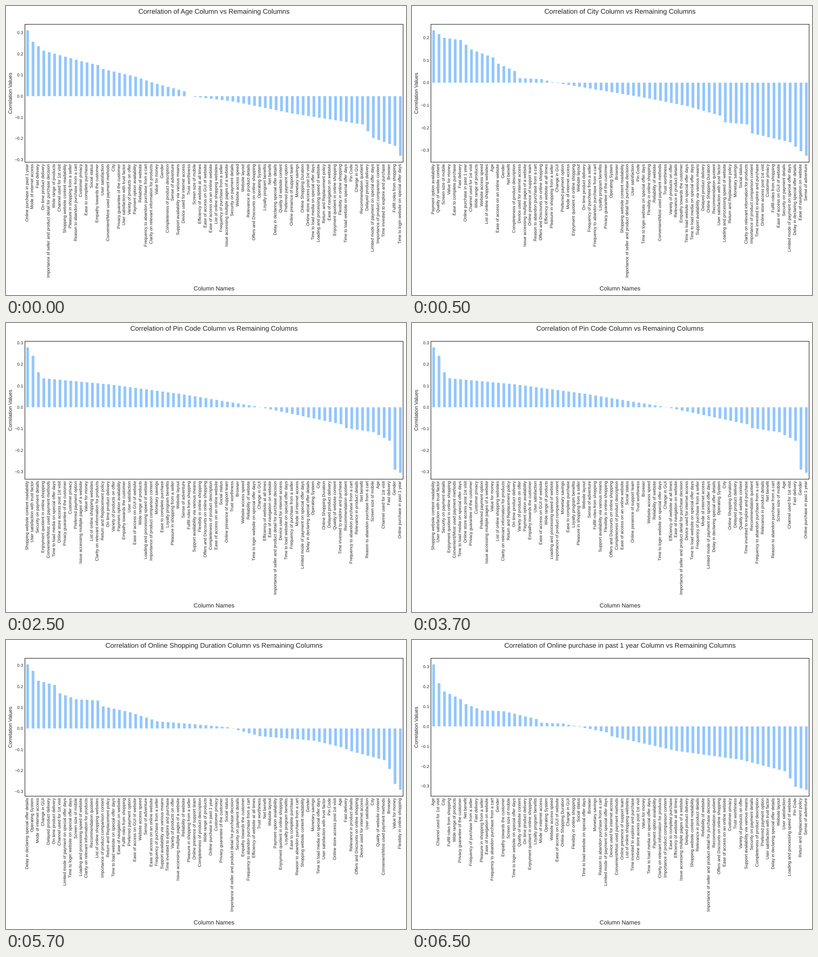
An HTML page for the animation above (8 s loop, 880 by 637 pixels).

```html
<!DOCTYPE html>
<html lang="en">
<head>
<meta charset="utf-8">
<title>Column correlations</title>
<style>
html, body { margin: 0; width: 100%; height: 100%; overflow: hidden; background: #fff; }
svg { display: block; width: 880px; height: 637px; }
text {
  font-family: "Liberation Sans", Arial, sans-serif;
  font-size: 9.35px;
  fill: #262626;
  text-rendering: geometricPrecision;
}
.title { font-size: 14.93px; text-anchor: middle; }
.xname { font-size: 13px; text-anchor: middle; }
.yname { font-size: 11.15px; text-anchor: middle; }
.end { text-anchor: end; }
.bar { fill: #92c6ff; }
.frame { fill: none; stroke: #262626; stroke-width: 1.2; }
</style>
</head>
<body>
<svg id="stage" viewBox="0 0 880 637"></svg>
<script>
const names = {};
`age Age
city City
pin Pin Code
dur Online Shopping Duration
year Online purchase in past 1 year
mode Mode of internet access
fast Fast delivery
ontime On time product delivery
seller Importance of seller and product detail for purchase decision
range Wide range of products
chan Channel used for 1st visit
read Shopping website content readability
pleas Pleasure in shopping from a seller
reason Reason to abandon purchase from a cart
cpriv Customer privacy
compl Ease to complete purchase
social Social status
empathy Empathy towards the customer
user User satisfaction
conv Convenient/Most used payment methods
guar Privacy guarantee of the customer
trust User satisfaction with trust factor
variety Variety of products on offer
payopt Payment option availability
reliab Reliability of website
abandon Frequency to abandon purchase from a cart
clarity Clarity on relevant information for products
value Value for money
gender Gender
desc Completeness of product description
sense Sense of adventure
support Support availability via various means
device Device used for internet access
worthy Trust worthiness
screen Screen size of mobile
effic Efficiency of website at all times
gui Ease of access on GUI of website
access Ease of access on an online website
list List of online shopping websites
freq Frequency of purchase from a seller
issue Issue accessing multiple pages of a website
secur Security on payment details
speed Website access speed
layout Website layout
relev Relevance in product details
offers Offers and Discounts on online shopping
os Operating System
loyal Loyalty program benefits
net Net benefit
delay Delay in declaring special offer details
quality Quality of website content
prefer Preferred payment option
team Online presence of support team
money Monetary savings
post Online store access post 1st visit
media Time to load media on special offer days
loading Loading and processing speed of website
policy Return and Replacement policy
nav Ease of navigation on website
enjoy Enjoyment quotient in online shopping
flex Flexibity in online shopping
webload Time to load website on special offer days
change Change in GUI
recom Recommendation quotient
delayed Delayed product delivery
limited Limited mode of payment on special offer days
compare Importance of product comparison content
invest Time invested to explore and purchase
browser Browser
roles Fulfill roles from shopping
login Time to login website on special offer days`.split('\n').forEach(row => {
  const cut = row.indexOf(' ');
  names[row.slice(0, cut)] = row.slice(cut + 1);
});

const stage = document.getElementById('stage');
const box = { left: 41.6, right: 873.6, top: 40.4, bottom: 344.3 };
const midX = (box.left + box.right) / 2;
const barTop = 53.7, barSpan = 276.4;
const charts = [];

function add(parent, tag, attrs, text) {
  const el = document.createElementNS('http://www.w3.org/2000/svg', tag);
  for (const k in attrs) el.setAttribute(k, attrs[k]);
  if (text) el.textContent = text;
  parent.appendChild(el);
  return el;
}

const upright = (x, y) => `translate(${x} ${y}) rotate(-90)`;

// Height of the falling curve at bar i, straight between its bends.
function valueAt(bends, i) {
  const k = Math.max(1, bends.findIndex(b => b[0] >= i));
  const [x0, v0] = bends[k - 1], [x1, v1] = bends[k];
  return v0 + (v1 - v0) * (i - x0) / (x1 - x0);
}

// Bends are [bar index, correlation in thousandths].
function chart(start, key, order, bends) {
  const g = add(stage, 'g', { visibility: 'hidden' });
  const ids = order.split(/\s+/);
  const max = bends[0][1], min = bends[bends.length - 1][1];
  const scale = barSpan / (max - min);
  const zero = barTop + max * scale;
  const pad = (max - min) * 0.05;
  const step = (box.right - box.left) / ids.length;

  add(g, 'text', { class: 'title', x: midX, y: 17.2 },
    `Correlation of ${names[key]} Column vs Remaining Columns`);

  for (let v = -300; v <= 300; v += 100) {
    if (v < min - pad || v > max + pad) continue;
    const label = (v < 0 ? '\u2212' : '') + (Math.abs(v) / 1000).toFixed(1);
    add(g, 'text', { class: 'end', x: 37.6, y: zero - v * scale + 3.3 }, label);
  }

  ids.forEach((id, i) => {
    const x = box.left + (i + 0.5) * step;
    const h = valueAt(bends, i) * scale;
    add(g, 'rect', {
      class: 'bar', x: x - step / 4, width: step / 2,
      y: zero - Math.max(h, 0), height: Math.abs(h)
    });
    add(g, 'text', { class: 'end', transform: upright(x + 1, 348.6) }, names[id]);
  });
  charts.push({ start, g });
}

chart(0, 'age',
  `year mode fast ontime seller range chan read pleas reason cpriv compl social empathy
  user conv city guar trust variety payopt reliab abandon clarity value gender desc sense
  support device worthy screen effic gui access list freq issue secur speed layout relev
  offers os loyal net delay quality prefer team money dur post media loading policy nav
  enjoy flex webload pin change recom delayed limited compare invest browser roles login`,
  [[0, 311], [1, 257], [3, 215], [10, 165], [13, 147], [14, 128], [20, 92], [23, 65],
   [29, 23], [30, 0], [38, -25], [49, -82], [62, -134], [64, -198], [68, -235], [69, -282]]);

chart(500, 'city',
  `payopt quality screen value compl fast year chan range speed list age access gender net
  desc device issue team reason offers effic pleas change prefer mode enjoy layout ontime
  freq abandon loyal guar os browser read seller user pin login flex reliab conv worthy
  variety relev empathy webload media support delayed dur recom trust loading policy money
  social clarity compare invest post cpriv roles gui secur limited delay nav sense`,
  [[0, 232], [2, 199], [5, 189], [7, 147], [11, 112], [12, 84], [15, 52], [16, 20],
   [20, 16], [22, 2], [30, -30], [39, -66], [47, -104], [53, -146], [54, -176],
   [58, -185], [59, -225], [66, -264], [69, -324]]);

chart(2500, 'pin',
  `read trust secur enjoy conv media post guar cpriv prefer issue value list clarity policy
  ontime variety payopt empathy user gui range loading compare money compl loyal pleas
  layout sense roles support flex offers desc access social team worthy browser speed
  reliab login change effic nav seller device webload freq mode limited delay os city dur
  delayed quality invest recom abandon relev net reason screen age chan fast gender year`,
  [[0, 279], [1, 240], [2, 163], [3, 135], [15, 107], [28, 63], [43, 1], [58, -79],
   [59, -97], [64, -116], [67, -156], [68, -290], [69, -305]]);

chart(4500, 'dur',
  `delay os mode change delayed ontime chan limited login screen loading clarity recom list
  compare policy webload nav roles prefer gui speed sense access freq support invest
  variety issue reliab pleas team desc range year cpriv guar social seller secur empathy
  abandon effic worthy net layout payopt enjoy loyal compl reason read gender money media
  trust pin post age fast relev offers device user city quality conv browser value flex`,
  [[0, 305], [1, 274], [2, 227], [5, 207], [6, 167], [9, 139], [13, 133], [14, 105],
   [19, 77], [24, 34], [30, 22], [37, 6], [43, -37], [53, -58], [58, -89], [60, -109],
   [66, -151], [67, -193], [68, -264], [69, -292]]);

chart(6500, 'year',
  `age chan city roles range guar net freq fast pleas nav abandon gender empathy screen
  login quality ontime enjoy loyal mode os speed gui dur change flex social webload browser
  money reason limited device conv team list invest post value media payopt clarity compare
  compl effic issue delayed read relev reliab seller recom offers access cpriv worthy
  variety support secur desc prefer trust delay layout user loading pin policy sense`,
  [[0, 311], [1, 216], [2, 175], [5, 137], [6, 112], [9, 80], [13, 76], [19, 37],
   [20, 18], [24, 14], [32, -30], [33, -50], [45, -123], [57, -168], [65, -225],
   [66, -261], [67, -303], [69, -318]]);

add(stage, 'rect', {
  class: 'frame', x: box.left, y: box.top,
  width: box.right - box.left, height: box.bottom - box.top
});
add(stage, 'text', { class: 'xname', x: midX, y: 627.3 }, 'Column Names');
add(stage, 'text', { class: 'yname', transform: upright(13.2, 192.4) }, 'Correlation Values');

const loop = 8000;
let shown = null;

function draw() {
  const t = performance.now() % loop;
  const now = charts.filter(c => c.start <= t).pop();
  if (now !== shown) {
    if (shown) shown.g.setAttribute('visibility', 'hidden');
    now.g.setAttribute('visibility', 'visible');
    shown = now;
  }
  requestAnimationFrame(draw);
}
draw();
</script>
</body>
</html>
```
